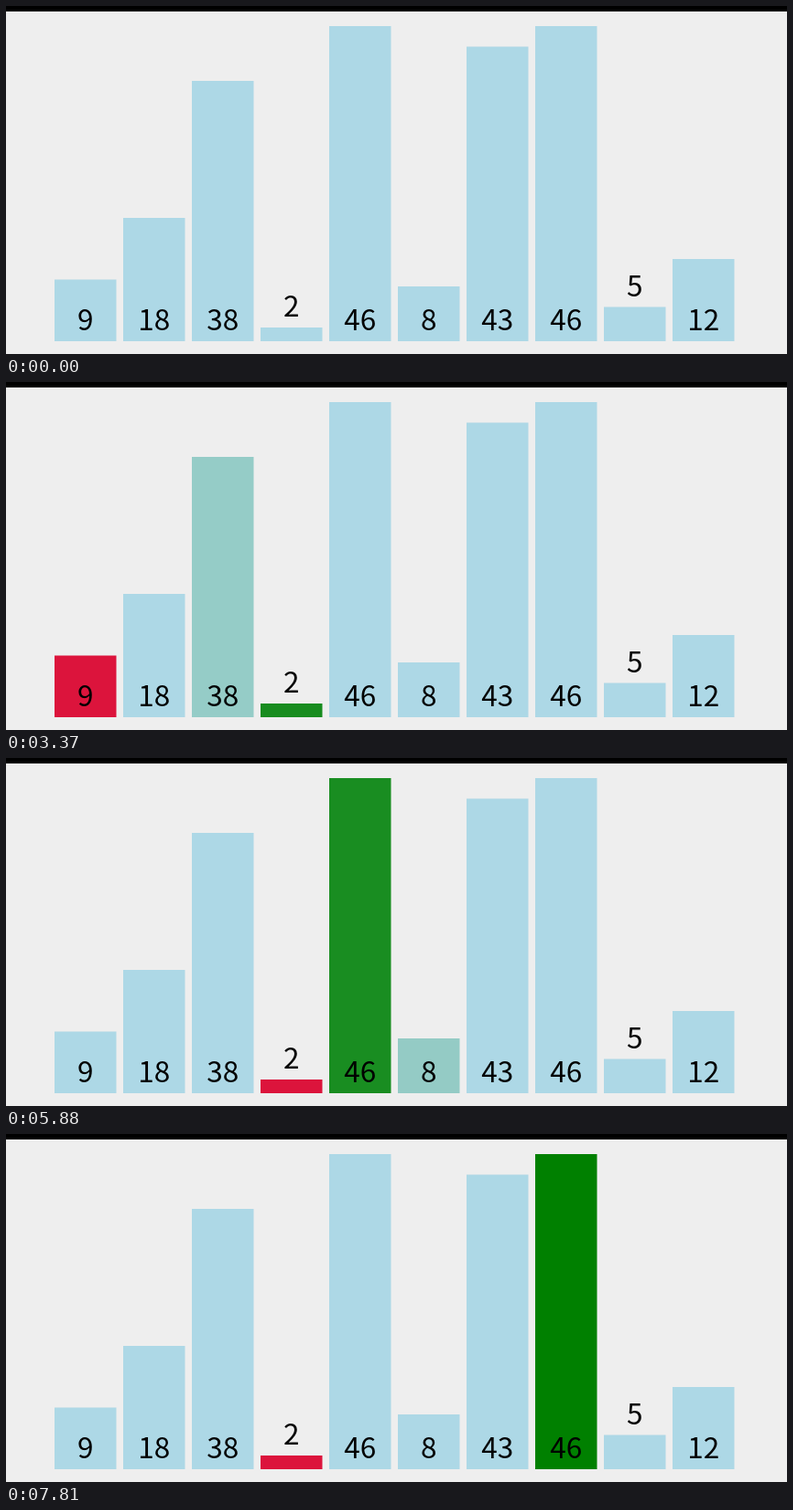
An HTML page with a canvas for the animation above (8 s loop, 853 px wide and 381 px high).

```html
<!DOCTYPE html>
<html lang="en">
<head>
<meta charset="utf-8">
<title>Selection sort</title>
<style>
html, body { margin: 0; height: 100%; overflow: hidden; background: #eee; }
canvas { display: block; }
</style>
</head>
<body>
<canvas id="stage" width="853" height="381"></canvas>
<script>
const ctx = document.getElementById('stage').getContext('2d');
const LOOP = 8000, FLOOR = 367, UNIT = 7.5;
const FIRST = 478, INTERVAL = 884, FADE = 250; // fade timing in ms
const TICK = 77.75, TICK_START = 500, SLACK = 4; // the picture refreshes once per tick
const BLUE = [173, 216, 230], GREEN = [0, 128, 0], RED = [220, 20, 60];
const values = [9, 18, 38, 2, 46, 8, 43, 46, 5, 12];

// Search for the minimum: red marks the smallest so far, green the bar being compared
function searchSteps() {
  const steps = [{ 0: RED }];
  let min = 0;
  for (let i = 1; i < values.length; i++) {
    steps.push(i - 1 === min ? { [i]: GREEN } : { [i - 1]: BLUE, [i]: GREEN });
    if (values[i] < values[min]) {
      steps.push({ [min]: BLUE, [i]: RED });
      min = i;
    }
  }
  return steps;
}
const steps = searchSteps();

const clamp = p => Math.min(1, Math.max(0, p));
const cubicInOut = p => p < .5 ? 4 * p ** 3 : 1 - 4 * (1 - p) ** 3;
const mix = (a, b, p) => a.map((v, i) => v + (b[i] - v) * p);

function coloursAt(t) {
  const colours = values.map(() => BLUE);
  steps.forEach((targets, k) => {
    const p = cubicInOut(clamp((t - FIRST - k * INTERVAL) / FADE));
    for (const i in targets) colours[i] = mix(colours[i], targets[i], p);
  });
  return colours;
}

function draw(t) {
  const ticks = Math.floor((t - TICK_START + SLACK) / TICK);
  const colours = coloursAt(TICK_START + ticks * TICK);
  ctx.fillStyle = '#eee';
  ctx.fillRect(0, 0, 853, 381);
  ctx.fillStyle = '#000';
  ctx.fillRect(0, 0, 853, 6);
  ctx.font = '31.5px "Noto Sans CJK SC", "Noto Sans CJK JP", "Noto Sans CJK", "Open Sans", sans-serif';
  ctx.textAlign = 'center';
  values.forEach((value, i) => {
    const x = 53 + 75 * i, height = value * UNIT, top = FLOOR - height;
    ctx.fillStyle = `rgb(${colours[i].map(Math.round)})`;
    ctx.fillRect(x, top, 67.5, height);
    ctx.fillStyle = '#000';
    ctx.fillText(value, x + 33.75, height < 50 ? Math.round(top - 12) : FLOOR - 12);
  });
}

function frame() {
  draw(performance.now() % LOOP);
  requestAnimationFrame(frame);
}
frame();
</script>
</body>
</html>
```
